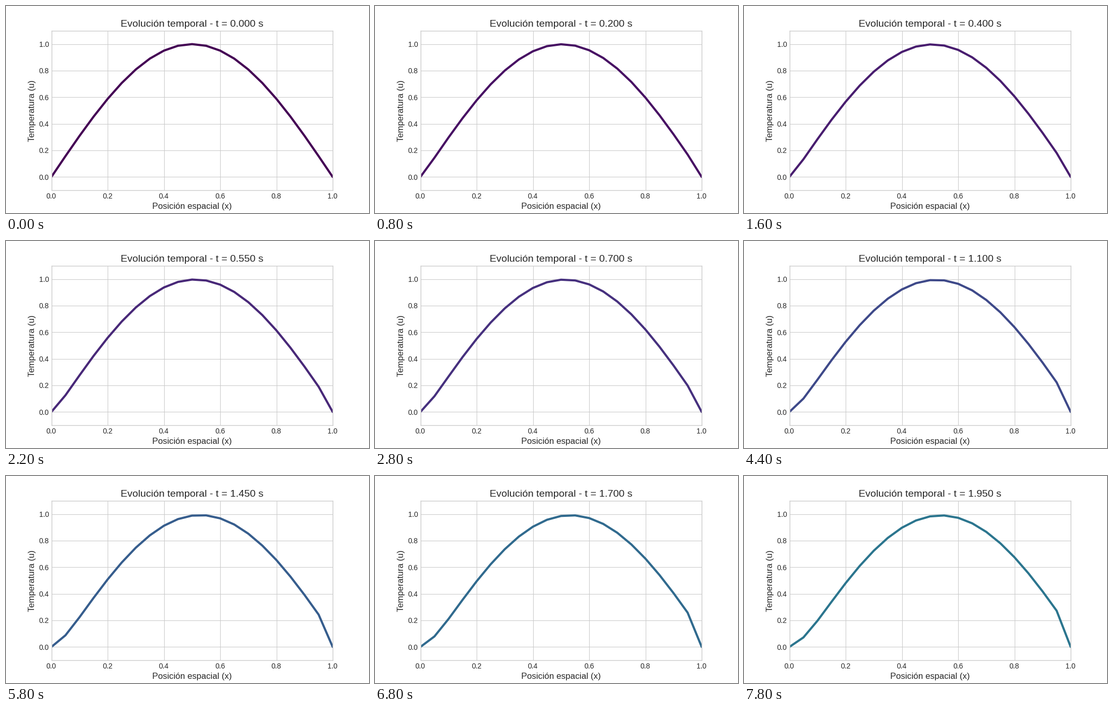
Animation of 700 by 400 pixels, one loop 8 s. Source, as a matplotlib script:

```python
import numpy as np
import matplotlib.pyplot as plt
from matplotlib.animation import FuncAnimation

plt.style.use("seaborn-v0_8-whitegrid")
plt.rcParams["font.family"] = "Liberation Sans"

SPEED = 0.02      # advection velocity
DT = 0.05         # simulated seconds per frame
T_END = 5.0       # time at which the colour map ends
FRAMES = 40
SUBSTEPS = 10

x = np.linspace(0, 1, 21)


def solve():
    """Upwind advection of a sine bump with both ends held at zero."""
    u = np.sin(np.pi * x)
    u[0] = u[-1] = 0
    k = SPEED * DT / SUBSTEPS / (x[1] - x[0])
    states = [u.copy()]
    for _ in range(FRAMES - 1):
        for _ in range(SUBSTEPS):
            u[1:-1] -= k * (u[1:-1] - u[:-2])
        states.append(u.copy())
    return states


states = solve()

fig, ax = plt.subplots(figsize=(7, 4), dpi=100)
line, = ax.plot(x, states[0], lw=3)
ax.set_xlim(0, 1)
ax.set_ylim(-0.1, 1.1)
ax.set_xlabel("Posición espacial (x)", fontsize=12)
ax.set_ylabel("Temperatura (u)", fontsize=12)
title = ax.set_title("", fontsize=14)


def update(i):
    t = i * DT
    line.set_ydata(states[i])
    line.set_color(plt.cm.viridis(t / T_END))
    title.set_text(f"Evolución temporal - t = {t:.3f} s")
    return line, title


anim = FuncAnimation(fig, update, frames=FRAMES, interval=200,
                     init_func=lambda: update(0), repeat=True, repeat_delay=0)
plt.show()
```
